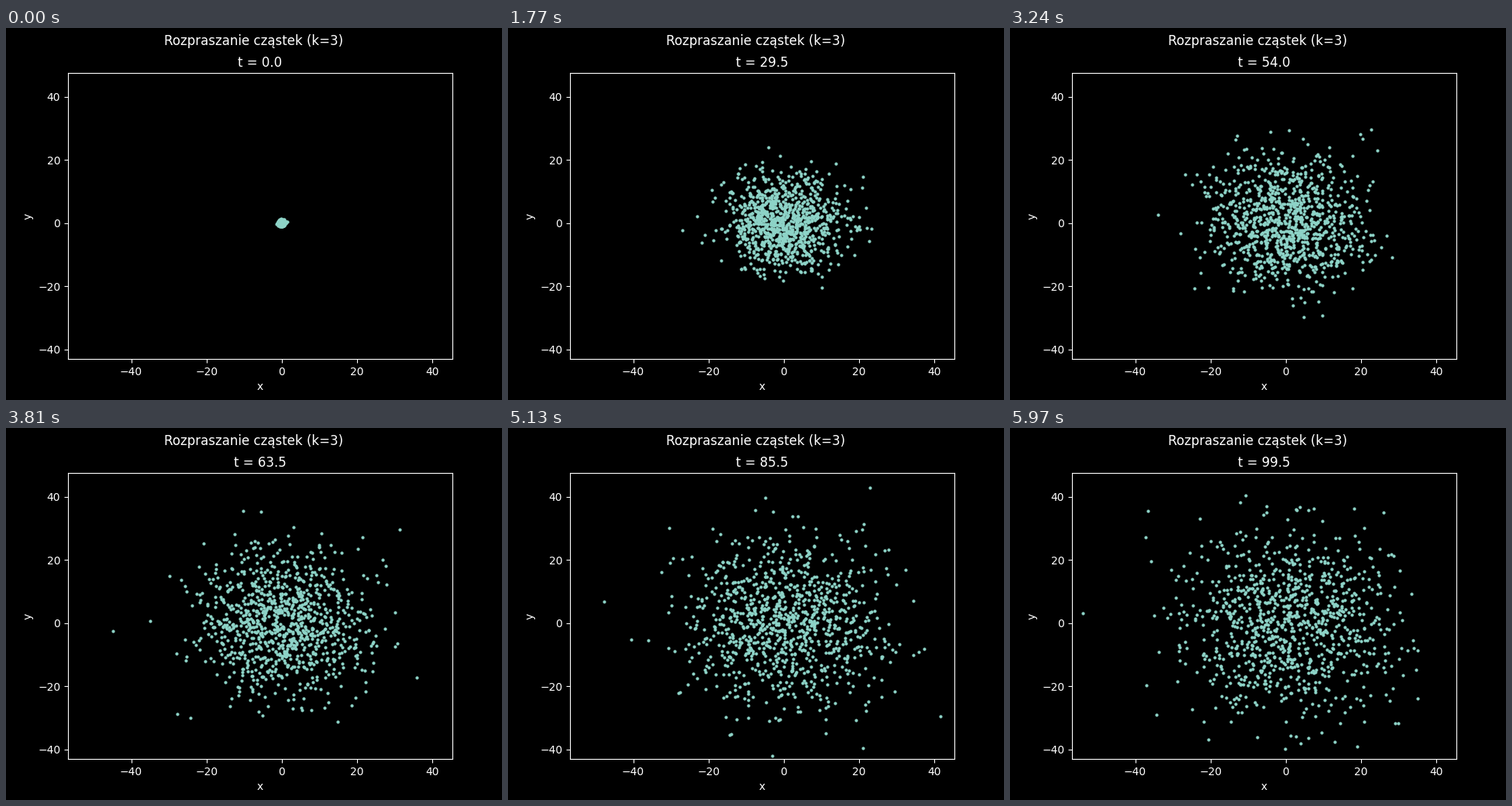
Write a matplotlib script that moves like this. It is 640 px wide and 480 px high and loops after 6 s.

```python
import numpy as np
import matplotlib.pyplot as plt
from matplotlib.animation import FuncAnimation

FRAMES, INTERVAL, DT = 200, 30, 0.5
COUNT = 1000
DIFFUSION = 1.0
START_SPREAD = 0.4
XLIM, YLIM = (-56.8, 45.35), (-43.1, 47.6)

rng = np.random.default_rng(3)


def walks(n):
    """Brownian paths, shape (n, FRAMES, 2), starting in a tight cluster."""
    steps = rng.normal(0, np.sqrt(2 * DIFFUSION * DT), (n, FRAMES, 2))
    steps[:, 0] = rng.normal(0, START_SPREAD, (n, 2))
    return steps.cumsum(axis=1)


def in_view(paths):
    """True for each path that never leaves the axes."""
    low, high = np.transpose([XLIM, YLIM])
    return ((paths > low) & (paths < high)).all(axis=(1, 2))


paths = walks(COUNT + COUNT // 5)
cloud = paths[in_view(paths)][:COUNT]

plt.style.use("dark_background")
fig, ax = plt.subplots(figsize=(6.4, 4.8), dpi=100)
fig.suptitle("Rozpraszanie cząstek (k=3)", y=0.9825)
ax.set(xlim=XLIM, ylim=YLIM, xlabel="x", ylabel="y")
ax.set_xticks(range(-40, 41, 20))
ax.set_yticks(range(-40, 41, 20))
title = ax.set_title("t = 0.0", pad=5.3)
dots = ax.scatter(*cloud[:, 0].T, s=4)


def update(i):
    dots.set_offsets(cloud[:, i])
    title.set_text(f"t = {i * DT:.1f}")
    return dots, title


anim = FuncAnimation(fig, update, frames=FRAMES, interval=INTERVAL,
                     repeat=True, repeat_delay=0, blit=False)
plt.show()
```
